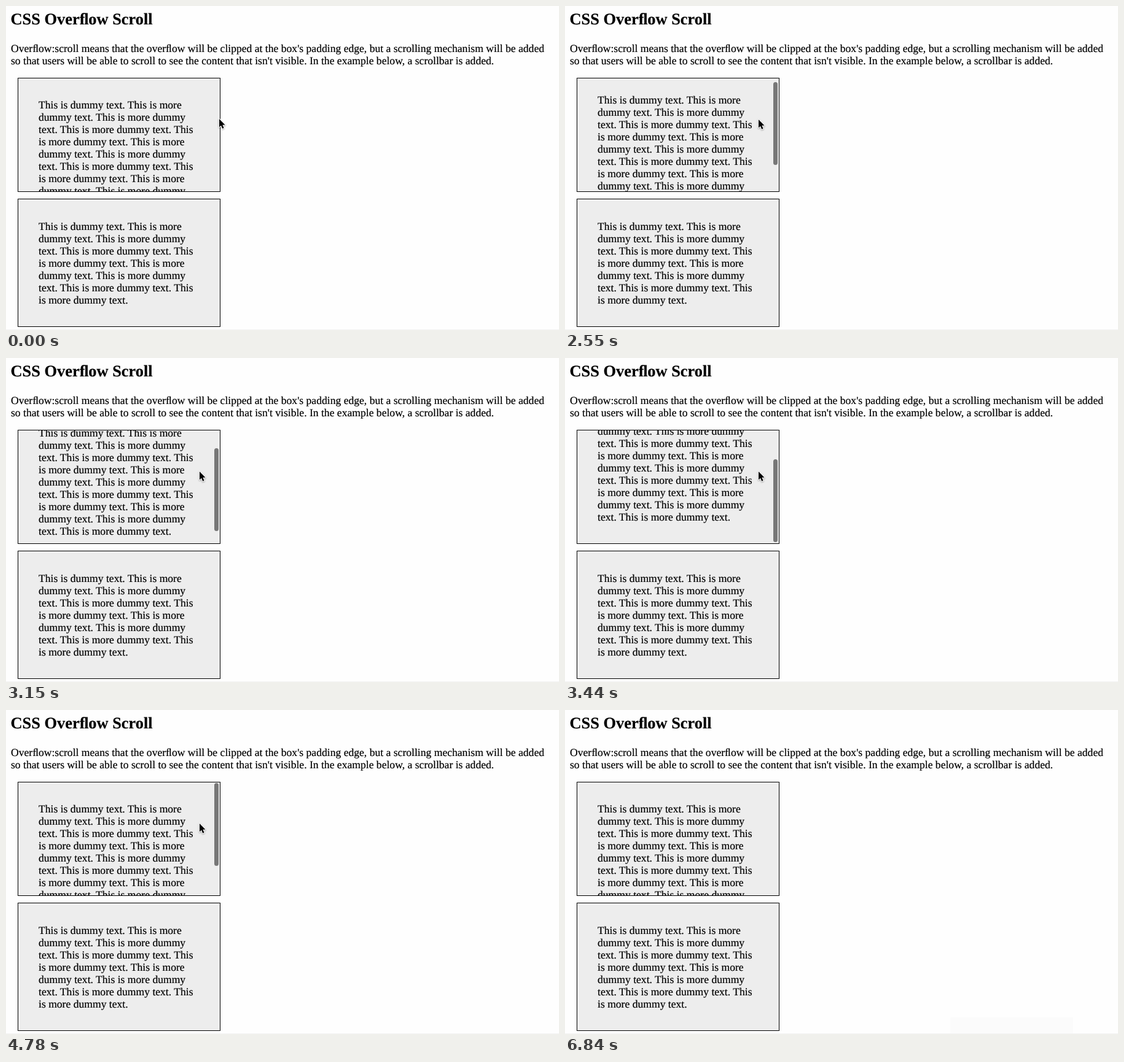
Recreate the animation shown at these times as an HTML page. Size 900 by 528 pixels, loop 6.94 s.

```html
<!DOCTYPE html>
<html lang="en">
<head>
<meta charset="utf-8">
<title>Overflow scroll</title>
<style>
  html, body { margin: 0; width: 100%; height: 100%; overflow: hidden; background: #fefefe; }
  #stage {
    position: relative; width: 900px; height: 528px; overflow: hidden;
    font: 17.6px/20px "Liberation Serif", serif; color: #000;
    text-rendering: geometricPrecision; -webkit-text-stroke: 0.2px #000;
  }
  #stage > *, .box > * { position: absolute; margin: 0; }
  h2, p { white-space: pre; }
  h2 { left: 7.5px; top: 6px; font-size: 26.4px; line-height: 30px; }
  p { left: 8px; top: 59px; }
  .box {
    left: 19px; width: 330px; box-sizing: border-box; overflow: hidden;
    border: 1px solid #000; background: #ededed;
  }
  #scroller { top: 116.5px; height: 186px; }
  #plain { top: 314px; height: 209px; }
  .copy { left: 33px; width: 262px; }
  #scroller .copy { top: 33px; }
  #plain .copy { top: 34px; }
  #thumb { left: 319px; top: 1px; width: 7px; height: 135px; border-radius: 3.5px; background: #777; }
  #rule { left: 0; top: 527px; width: 900px; height: 1px; background: #f2f2f2; }
  #panel { left: 627px; top: 501px; width: 200px; height: 27px; background: #f0f0f0; }
  #cursor { left: 0; top: 0; overflow: visible; filter: drop-shadow(0 1px 1px #0005); }
</style>
</head>
<body>
<div id="stage">
  <h2>CSS Overﬂow Scroll</h2>
  <p>Overﬂow:scroll means that the overﬂow will be clipped at the box's padding edge, but a scrolling mechanism will be added
so that users will be able to scroll to see the content that isn't visible. In the example below, a scrollbar is added.</p>
  <div class="box" id="scroller"><div class="copy" id="longCopy"></div><div id="thumb"></div></div>
  <div class="box" id="plain"><div class="copy" id="shortCopy"></div></div>
  <div id="rule"></div>
  <div id="panel"></div>
  <svg id="cursor" width="12" height="18">
    <path d="M0 0V13.5L3 10.7L5.2 15.8L7.6 14.8L5.4 9.8H9.6Z"
      stroke="#fff" stroke-width="2" stroke-linejoin="round" paint-order="stroke"/>
  </svg>
</div>
<script>
const LOOP = 6940, FRAME_MS = 148.6;
const THUMB_RATIO = 46 / 62;
const $ = id => document.getElementById(id);

const dummyText = count => 'This is dummy text.' + ' This is more dummy text.'.repeat(count);
$('longCopy').textContent = dummyText(11);
$('shortCopy').textContent = dummyText(8);

// Smooth progress from 0 to 1 while the frame goes from start to end.
function ease(frame, start, end) {
  const u = Math.min(1, Math.max(0, (frame - start) / (end - start)));
  return u * u * (3 - 2 * u);
}

function move(id, x, y) {
  $(id).style.transform = `translate(${x}px, ${y}px)`;
}

function draw(frame) {
  const scroll = Math.floor(
    32 * ease(frame, 16, 19) + 30 * ease(frame, 20, 23) - 62 * ease(frame, 27.3, 30.9));
  move('longCopy', 0, -scroll);
  move('thumb', 0, Math.floor(scroll * THUMB_RATIO));

  // The thumb hides while the scrolling rests at the bottom.
  const thumbShown = frame >= 17 && (frame < 27 || frame >= 29);
  $('thumb').style.opacity = thumbShown ? 1 - ease(frame, 41, 43) : 0;

  const enter = ease(frame, 8, 10.3), drop = ease(frame, 37, 38.5), leave = ease(frame, 40, 42);
  move('cursor',
    347 - 32 * enter - 20 * drop + 486 * leave,
    184 + enter + 160 * drop + 230 * leave);

  $('panel').style.opacity = frame >= 42 ? 1 - ease(frame, 44, 47) : 0;
}

const start = performance.now();
function tick() {
  draw(Math.floor((performance.now() - start) % LOOP / FRAME_MS));
  requestAnimationFrame(tick);
}
tick();
</script>
</body>
</html>
```
